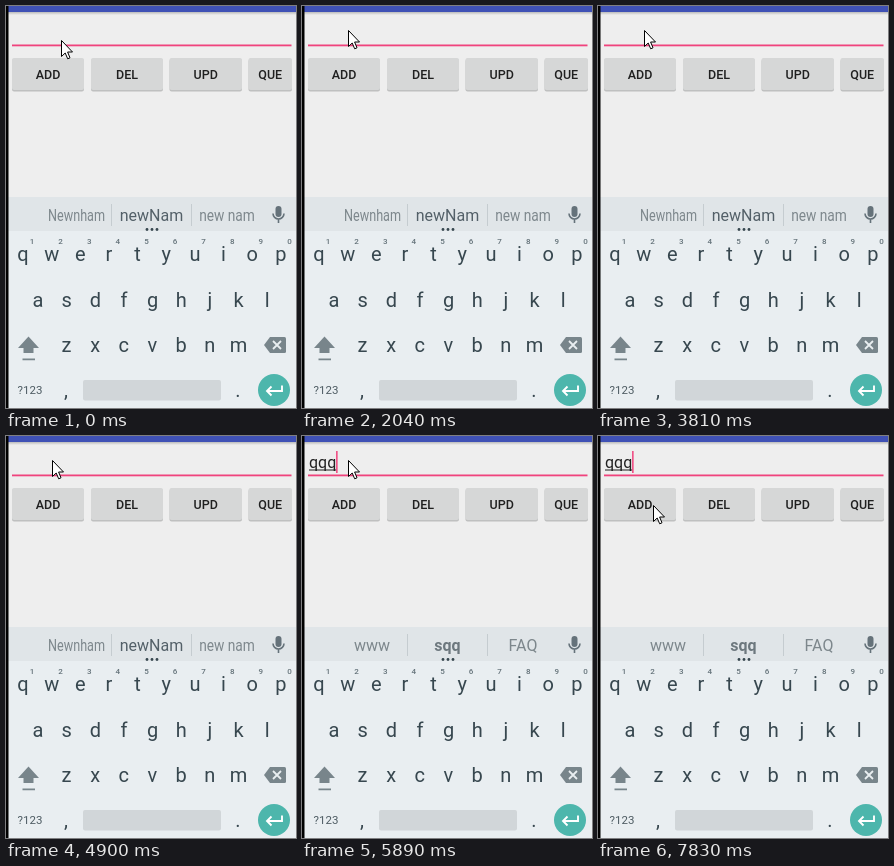
Write an HTML page that moves like this. It is 290 by 402 pixels and loops after 8000 ms.

```html
<!DOCTYPE html>
<html lang="en">
<head>
<meta charset="utf-8">
<title>Typing into a form</title>
<style>
  html, body { margin: 0; width: 100%; height: 100%; overflow: hidden; background: #eee; }
  svg { display: block; font-family: Roboto, sans-serif; }
  .mid { text-anchor: middle; }
  .button { font-size: 12.5px; font-weight: 500; fill: #202020; }
  .key { font-size: 20px; fill: #37474f; }
  .hint { font-size: 8px; font-weight: 500; fill: #65737a; }
  .word { font-size: 16px; fill: #7d878c; }
  .icon { fill: #78858b; }
</style>
</head>
<body>
<svg width="290" height="402" viewBox="0 0 290 402">
  <defs>
    <linearGradient id="shade" x2="0" y2="1">
      <stop stop-color="#bbb"/><stop offset="1" stop-color="#eee"/>
    </linearGradient>
  </defs>
  <rect width="290" height="402" fill="#eee"/>
  <rect y="6" width="290" height="3" fill="url(#shade)"/>
  <rect width="290" height="6" fill="#3f51b5"/>
  <rect x="6" y="38.5" width="279.5" height="1.8" fill="#f0437d"/>

  <g id="entry">
    <text id="typed" x="7" y="32" font-size="16" fill="#212121"></text>
    <rect id="underline" x="7" y="33.5" height="1" fill="#212121"/>
    <rect id="caret" y="15" width="1.5" height="22" fill="#f0437d"/>
  </g>
  <g id="buttons"></g>

  <rect y="191" width="290" height="211" fill="#e9eef1"/>
  <rect y="191" width="290" height="34" fill="#e0e5e8"/>
  <path d="M105.5 198v22M185.5 198v22" stroke="#c5ccd0"/>
  <g id="words"></g>
  <g fill="#37474f">
    <circle cx="141" cy="223.5" r="1.4"/><circle cx="146" cy="223.5" r="1.4"/><circle cx="151" cy="223.5" r="1.4"/>
  </g>
  <rect x="269.5" y="200" width="6" height="11" rx="3" fill="#65727a"/>
  <path d="M267 207.5a5.5 5.5 0 0 0 11 0M272.5 213v4" fill="none" stroke="#65727a" stroke-width="1.6"/>

  <g id="keys"></g>
  <path class="icon" d="M22.5 330.500L33 342H27.500V347H17.500V342H12ZM16.500 352.500h12.500v1.800h-12.500z"/>
  <path class="icon" d="M264 331H278.500a1.500 1.500 0 0 1 1.500 1.500V345.500a1.500 1.500 0 0 1-1.500 1.500H264L258 339Z"/>
  <path d="M267 335l8 8m0-8l-8 8" stroke="#e9eef1" stroke-width="1.8"/>
  <text class="mid" x="24" y="388" font-size="11.5" fill="#4d5b62">?123</text>
  <rect x="77" y="374" width="138" height="20.500" rx="2" fill="#d1d6d9"/>
  <circle cx="268" cy="384" r="16" fill="#4db6ac"/>
  <path d="M276 379.500V385H261M265.500 380.500L261 385L265.500 389.500" fill="none" stroke="#fff" stroke-width="1.900"/>

  <rect width="2.500" height="402"/>
  <path id="pointer" d="M.5 .5V16.500L4.200 13L6.700 18.800L9 17.800L6.600 12H11.500Z" fill="#fff" stroke="#000"/>
</svg>
<script>
const $ = id => document.getElementById(id);
const label = (cls, x, y, text) => `<text class="mid ${cls}" x="${x}" y="${y}">${text}</text>`;

$('buttons').innerHTML = [['ADD', 6, 72], ['DEL', 85, 72], ['UPD', 163.5, 72.5], ['QUE', 242.5, 43.5]]
  .map(([text, x, w]) =>
    `<rect x="${x}" y="53" width="${w}" height="32.500" rx="2" fill="#bfc0c0"/>` +
    `<rect x="${x}" y="52" width="${w}" height="32" rx="2" fill="#d6d7d7"/>` +
    label('button', x + w / 2, 73, text)).join('');

const row = (letters, x, y) => [...letters].map((c, i) => label('key', x + 28.65 * i, y, c)).join('');
$('keys').innerHTML =
  row('qwertyuiop', 17, 255) + row('asdfghjkl', 32, 301) + row('zxcvbnm', 60.5, 346) +
  label('key', 60, 391, ',') + label('key', 232, 391, '.') +
  [...'1234567890'].map((c, i) => label('hint', 26 + 28.6 * i, 238, c)).join('');

// Long side suggestions are set in a condensed face.
const word = (text, x, squeeze = 1, style = '') =>
  `<text class="mid word" transform="translate(${x} 215) scale(${squeeze} 1)" ${style}>${text}</text>`;
const bold = 'font-weight="700" style="fill:#6d787e"';
const plain = 'style="fill:#536068"';
const trio = (a, b, c) => word(a, 70) + word(b, 145.5, 1, bold) + word(c, 221);

const suggestions = [
  [0, word('Newnham', 70.5, .79) + word('newNam', 145.5, 1, plain) + word('new nam', 221, .86)],
  [5050, trio('was', 'q', 'queen')],
  [5490, trio('was', 'AQ', 'AW')],
  [5890, trio('www', 'sqq', 'FAQ')]
];
const typing = [[0, ''], [5050, 'q'], [5490, 'qq'], [5770, 'qqq']];
const pointer = [
  [0, [55, 34]], [840, [50, 29]], [960, [46, 24]], [6440, [48, 50]], [6570, [51, 81]],
  [6720, [55, 73]], [6870, [56, 70]], [7710, [56, 69]], [7830, [55, 69]]
];
const blinks = [440, 960, 1360, 1790, 2320, 2880, 3410, 3810, 4360, 4900, 5050, 6320, 6870, 7400, 7830];
const at = (steps, t) => steps.findLast(([start]) => start <= t)[1];

let shown;
function draw() {
  const t = performance.now() % 8000;
  const text = at(typing, t), words = at(suggestions, t);
  const width = text.length * 9.1;
  $('typed').textContent = text;
  $('underline').setAttribute('width', width);
  $('caret').setAttribute('x', 6.8 + width);
  $('caret').setAttribute('visibility', blinks.filter(b => b <= t).length % 2 ? 'visible' : 'hidden');
  $('pointer').setAttribute('transform', `translate(${at(pointer, t)})`);
  if (words !== shown) $('words').innerHTML = shown = words;
  requestAnimationFrame(draw);
}
draw();
</script>
</body>
</html>
```
